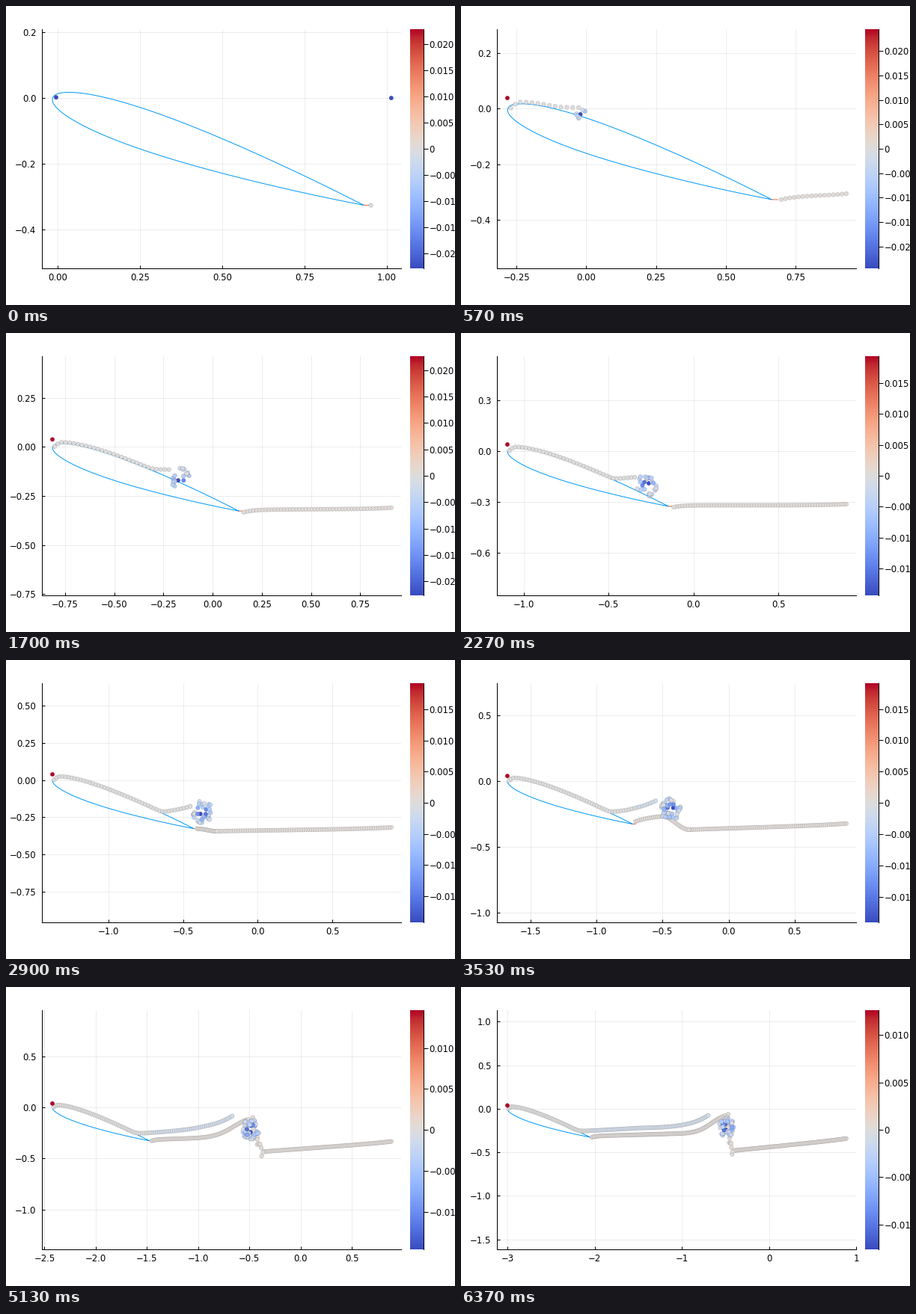
A matplotlib script that plays this animation: 600 px wide and 400 px high, repeating every 6.41 s.

```python
import numpy as np
import matplotlib
import matplotlib.pyplot as plt
from matplotlib.animation import FuncAnimation

matplotlib.rcParams["font.family"] = "DejaVu Sans"

W, H, DPI = 600, 400, 100
FRAMES, LOOP, FPS = 192, 6410, 30
INTERVAL = LOOP / FRAMES
STEP = 1 / 64                      # distance flown per step
PX = 72 / DPI
TICK_SIZE = 8.4
rng = np.random.default_rng(4)


def naca(t, x):
    return 5 * t * (0.2969 * np.sqrt(x) - 0.126 * x - 0.3516 * x**2
                    + 0.2843 * x**3 - 0.1036 * x**4)


# Foil at rest, nose pitched up
ALPHA, NOSE = np.radians(19.05), -0.0155
chord = (1 - np.cos(np.linspace(0, np.pi, 90))) / 2
thick = naca(0.12, chord)
ca, sa = np.cos(ALPHA), np.sin(ALPHA)
upper = np.c_[NOSE + chord * ca + thick * sa, -chord * sa + thick * ca]
lower = np.c_[NOSE + chord * ca - thick * sa, -chord * sa - thick * ca]
foil = np.vstack([upper[::-1], lower[1:]])
TE, SHED = upper[-1], np.array([0.952, -0.327])
LE_DOT, LEAD = np.array([-0.005, 0.002]), np.array([-0.017, 0.038])

N_CORE, N_LINK = 48, 16
core_r = np.sqrt(rng.random(N_CORE))
core_a = rng.random(N_CORE) * 2 * np.pi
core_v = -np.clip((1.2 - core_r) * 1.1 * rng.random(N_CORE), 0.03, 1)
core_v[np.argmin(core_r)] = -1
link_jit = rng.normal(0, 0.02, (N_LINK, 2))


def approach(n, tau, power=1):
    """Ease from 0 to 1, starting at n = 0."""
    return 1 - np.exp(-(max(n, 0) / tau)**power)


def dots_along(x, y, gap):
    s = np.r_[0, np.cumsum(np.hypot(np.diff(x), np.diff(y)))]
    at = np.arange(0, s[-1] + 1e-9, gap)
    return np.c_[np.interp(at, s, x), np.interp(at, s, y)]


def trailing_wake(n):
    """Sheet rising into the vortex, a breaking link, and the old tail."""
    te = SHED[0] - n * STEP
    right = 0.952 - 0.07 * approach(n, 50)
    right_y = -0.327 + 0.029 * approach(n, 8) - 0.00023 * n
    dip = max(te, -0.3 - 0.0014 * (n - 106))
    dip_y = -0.313 - 0.00132 * max(n - 70, 0)
    lift = 0.27 * approach(n - 98, 38)

    def hook(x):
        return -0.014 * np.exp(-(x - te) / 0.05)

    def sheet(x):
        return (-0.313 + hook(x) + 0.11 * lift * np.minimum(x - te, 0.9)
                + lift / (1 + np.exp(-(x + 0.66) / 0.09)))

    x = np.linspace(right, dip, 80)
    u = (right - x) / (right - dip + 1e-9)
    sag = 0.009 * approach(n, 40) * (1 - np.exp(-u / 0.15))
    y = right_y + (dip_y - right_y) * u - sag + hook(x)
    parts = [dots_along(x, y, STEP)]

    end = max(te, -0.5)
    if te < end:
        xs = np.linspace(te, end, 80)
        parts.append(dots_along(xs, sheet(xs), STEP))
    if end < dip:
        w = np.linspace(0, 1, N_LINK)
        ease = w * w * (3 - 2 * w)
        link = np.c_[end + (dip - end) * w,
                     sheet(end) + (y[-1] - sheet(end)) * ease]
        parts.append(link + link_jit * np.clip((n - 106) / 20, 0, 1))
    return np.vstack(parts)


def leading_sheet(n):
    """Follows the upper surface, then lifts off towards the vortex."""
    shift = n * STEP
    end = shift - 0.69 * approach(n, 85, 2)
    x, y = LE_DOT[:1], LE_DOT[1:]
    if end > 0.03:
        xs = np.linspace(0.02, end, 150)
        surface = np.interp(xs, *upper.T) + 0.006
        floor = np.clip(-0.0035 * (n - 18), -0.255, 0.02)
        free = (floor + 0.05 * np.clip(xs - 0.88, 0, 0.6)
                + 0.18 * approach(n - 60, 60) * np.exp((xs - end) / 0.22))
        soft = 0.006
        x = np.r_[x, xs]
        y = np.r_[y, soft * np.logaddexp(surface / soft, free / soft)]
    return dots_along(x - shift, y, 0.021)


def core(n):
    """Rolled-up vortex, turning clockwise and faster inside."""
    k = min(N_CORE, int(n / 2.5) + 1)
    r = 0.12 * approach(n, 80) * core_r
    ang = core_a - 0.12 * n / (0.4 + core_r)
    x = -0.49 * approach(n, 75, 2.3) + 0.85 * r * np.cos(ang)
    y = -0.215 * approach(n, 45, 2.5) + 0.95 * r * np.sin(ang)
    return np.c_[x, y][:k], core_v[:k]


def vortices(n):
    """Positions and strengths relative to the colour limit."""
    if n == 0:
        return np.array([SHED, LE_DOT, [1.014, 0]]), np.array([0, -1, -1])
    front = leading_sheet(n)
    tint = np.where(front[:, 0] + n * STEP > 0.95, -0.08, 0.0)
    lead = LEAD - [n * STEP, 0]
    groups = [(trailing_wake(n), 0.03), (front, tint), core(n),
              (lead[None], 1)]
    xy = np.vstack([g[0] for g in groups])
    v = np.concatenate([np.broadcast_to(g[1], len(g[0])) for g in groups])
    return xy, v


def label(x, digits):
    return f"{x + 0.0:.{digits}f}".replace("-", "\u2212")


def nice_ticks(lo, hi):
    """Ticks with the best mix of count, coverage and round steps."""
    best, pick = -1, None
    for z in (0, -1):
        for q, nice in ((5, .9), (3, .2), (2.5, .5), (2, .7), (1, 1)):
            step = q * 10.0**z
            k = np.arange(np.ceil(lo / step), np.floor(hi / step) + 1)
            m = len(k)
            if not 4 <= m <= 8:
                continue
            score = (0.25 * (1 - abs(m - 5) / 5) + (0 in k) / 6
                     + 0.5 * (hi - lo) / ((m - 1) * step) + 0.25 * nice)
            if score > best + 1e-9:
                best, pick = score, (k * step, step)
    ticks, step = pick
    digits = next(d for d in range(4)
                  if abs(step * 10**d - round(step * 10**d)) < 1e-6)
    return ticks, [label(t, digits) for t in ticks]


def place(x0, y0, x1, y1):
    return [x0 / W, 1 - y1 / H, (x1 - x0) / W, (y1 - y0) / H]


fig = plt.figure(figsize=(W / DPI, H / DPI), dpi=DPI, facecolor="white")
ax = fig.add_axes(place(48.4, 31.2, 528.4, 350.9))
ax.spines[["top", "right"]].set_visible(False)
ax.spines[["left", "bottom"]].set_linewidth(PX)
ax.tick_params(direction="in", length=4 * PX, width=PX, labelsize=TICK_SIZE)
ax.tick_params(axis="x", pad=6 * PX)
ax.tick_params(axis="y", pad=8 * PX)
ax.grid(color="black", alpha=0.1, linewidth=0.5)
ax.set_axisbelow(True)

foil_line, = ax.plot([], [], color="#009afa", lw=PX)
te_line, = ax.plot([], [], color="#e26f46", lw=PX)
dots = ax.scatter([], [], c=[], s=(5.6 * PX)**2, cmap="coolwarm",
                  vmin=-1, vmax=1, zorder=3,
                  edgecolors=(0, 0, 0, 0.2), linewidths=0.4)

bar = fig.add_axes(place(540, 31.2, 558, 350.9))
bar.imshow(np.linspace(-1, 1, 256)[:, None], cmap="coolwarm", aspect="auto",
           origin="lower", extent=(0, 1, -1, 1))
bar.set_xticks([])
bar.yaxis.tick_right()
bar.spines[["left", "top", "bottom"]].set_visible(False)
bar.spines["right"].set_linewidth(PX)
bar.tick_params(axis="y", length=6 * PX, width=PX, pad=1.5 * PX,
                labelsize=TICK_SIZE)


def draw_bar(n):
    lim = np.interp(n, [0, 34, 68, 106, 131, 154, 191],
                    [.0229, .026, .0193, .0191, .016, .0146, .0126])
    step, digits = (0.01, 2) if lim > 0.025 else (0.005, 3)
    m = int(lim / step)
    ks = range(-m, m + 1)
    bar.set_yticks([k * step / lim for k in ks],
                   [label(k * step, digits) if k else "0" for k in ks])


def draw(frame):
    # Simulation step reached just before this frame's slot ends
    n = min(int(((frame + 1) * INTERVAL - 1) * FPS / 1000), FRAMES - 1)
    shift = np.array([-n * STEP, 0])
    body = foil + shift
    xy, v = vortices(n)
    foil_line.set_data(*body.T)
    te_line.set_data(*np.array([TE + shift, SHED + shift]).T)
    dots.set_offsets(xy)
    dots.set_array(v)

    every = np.vstack([body, xy])
    (x0, y0), (x1, y1) = every.min(0), every.max(0)
    pad = 0.03 * (x1 - x0)
    x0, x1 = x0 - pad, x1 + pad
    half = (x1 - x0) * 320 / 480 / 2
    mid = (y0 + y1) / 2
    ax.set_xticks(*nice_ticks(x0, x1))
    ax.set_yticks(*nice_ticks(mid - half, mid + half))
    ax.set_xlim(x0, x1)
    ax.set_ylim(mid - half, mid + half)
    draw_bar(n)
    return foil_line, te_line, dots


anim = FuncAnimation(fig, draw, frames=FRAMES, interval=INTERVAL,
                     repeat=True, repeat_delay=0, blit=False)
plt.show()
```
